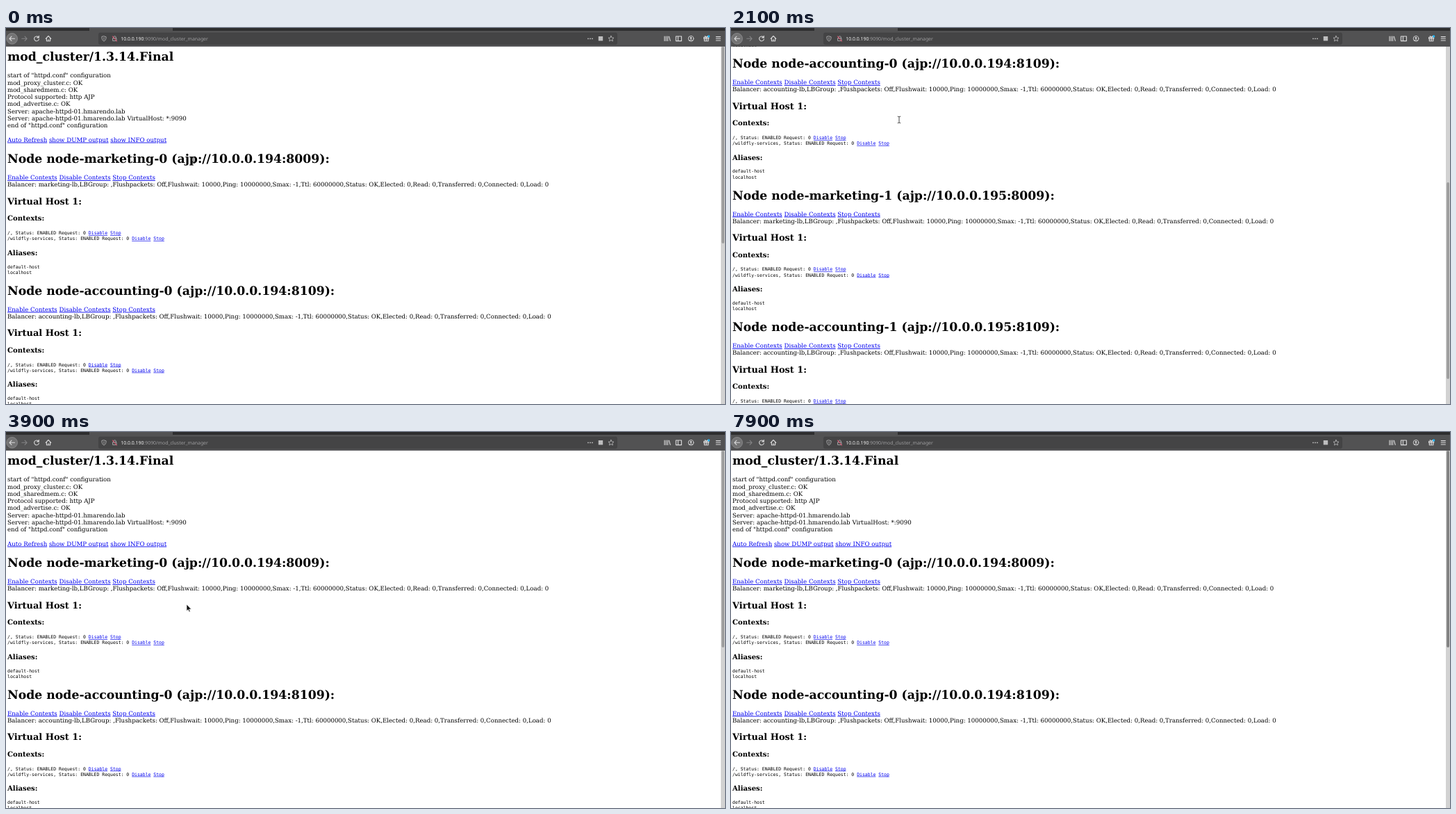
Animation, 1035 px wide and 541 px high, one loop 8200 ms. Source, as an HTML page:

```html
<!DOCTYPE html>
<html lang="en">
<head>
<meta charset="utf-8">
<title>mod_cluster manager</title>
<style>
html, body { margin: 0; width: 100%; height: 100%; overflow: hidden; background: #fff; }
svg { display: block; width: 1035px; height: 541px; }
text { text-rendering: geometricPrecision; }
#page { font-family: "DejaVu Serif", "Noto Serif", serif; }
.h1 { font-size: 17.25px; font-weight: bold; }
.h2 { font-size: 12.94px; font-weight: bold; }
.h3 { font-size: 10.09px; font-weight: bold; }
.body { font-size: 8.63px; }
.pre { font-size: 6.48px; font-family: "DejaVu Sans Mono", monospace; }
.link { fill: #0000ee; text-decoration: underline; }
#url { font: 6.9px "Noto Sans", sans-serif; fill: #9d9d9f; }
.icon { fill: none; stroke: #dcdcdd; stroke-width: 1.1; stroke-linecap: round; stroke-linejoin: round; }
</style>
</head>
<body>
<svg viewBox="0 0 1035 541">
  <g id="page"></g>
  <rect x="1029" y="26" width="6" height="515" fill="#d2d2d2"/>
  <rect id="thumb" x="1030.2" width="3.8" height="283" rx="1.9"/>

  <rect width="1035" height="5" fill="#2d2d2e"/>
  <rect y="4" width="1035" height="22.3" fill="#525253"/>
  <rect x="120" y="0" width="120" height="5" fill="#525253"/>
  <rect y="25.7" width="1035" height=".8" fill="#373738"/>
  <rect x="133.5" y="7" width="746" height="16.5" rx="2" fill="#444445" stroke="#3d3d3e" stroke-width=".5"/>
  <rect id="hover" x="36.5" y="7.8" width="15.5" height="14.8" rx="2"/>
  <circle cx="8.7" cy="15.3" r="7.8" fill="#737374" stroke="#979798" stroke-width=".7"/>
  <g class="icon">
    <path d="M12.5 15.3H5M8 12.2L5 15.3l3 3.1"/>
    <path d="M22.8 15.3h7.3M27.1 12.2l3 3.1-3 3.1" stroke="#858586"/>
    <path id="reload" d="M46.7 13.2A3.4 3.4 0 1 0 47.4 16M47.3 11.4v2.5h-2.6"/>
    <path d="M57.2 15.3l3.8-3.8 3.8 3.8M58.4 15v3.8h5.2V15M61 18.6v-2.2"/>
    <g stroke-width=".8" stroke="#bdbdbe">
      <path d="M141 11.8l3.1 1c0 3.2-.8 5.1-3.1 6.2-2.3-1.1-3.1-3-3.1-6.2zM141 13.7v3.1"/>
      <path d="M154.6 14.7v-1a1.9 1.9 0 0 1 3.8 0v1M154 14.8h5v3.6h-5z"/>
      <path d="M153.4 12l6 7" stroke="#e2506e" stroke-width="1.1"/>
      <path d="M871 11.3l1.2 2.6 2.8.3-2.1 1.9.6 2.8-2.5-1.4-2.5 1.4.6-2.8-2.1-1.9 2.8-.3z"/>
    </g>
    <path d="M948 12v6.5M950.3 12v6.5M952.6 12v6.5M954.4 12.2l1.8 6.2"/>
    <path d="M964.4 12h8v6.6h-8zM967.4 12v6.6"/>
    <circle cx="986" cy="15.3" r="3.8" stroke-width=".9"/>
    <path d="M983.7 17.7q2.3-2 4.6 0" stroke-width=".9"/>
    <path d="M1004.6 13.4h7v2h-7zM1005.3 15.4v3.4h5.6v-3.4M1008.1 13.4v5.4M1006.3 11.6l1.8 1.8 1.8-1.8"/>
    <path d="M1022.2 12.6h6.2M1022.2 15.3h6.2M1022.2 18h6.2"/>
  </g>
  <circle cx="1011.6" cy="12" r="1.7" fill="#28b5f4"/>
  <circle cx="986" cy="14.4" r="1.3" fill="#dcdcdd"/>
  <path d="M838 15.3h.01M841 15.3h.01M844 15.3h.01" stroke="#cfcfd0" stroke-width="1.7" stroke-linecap="round"/>
  <rect x="852.8" y="12" width="6.4" height="6.4" fill="#bdbdbe"/>
  <text id="url" x="165.3" y="17.9"><tspan fill="#f2f2f2">10.0.0.190</tspan>:9090/mod_cluster_manager</text>

  <g id="cursor">
    <path id="arrow" d="M0 0V9.6L2.2 7.6 3.7 11 5.2 10.3 3.7 7.1H6.7Z" fill="#111" stroke="#fff" stroke-width=".6"/>
    <path id="beam" d="M-2.2-4.8Q0-4.8 0-3.9Q0-4.8 2.2-4.8M0-4V4M-2.2 4.8Q0 4.8 0 3.9Q0 4.8 2.2 4.8" fill="none" stroke="#333" stroke-width=".9"/>
  </g>
</svg>
<script>
const $ = id => document.getElementById(id);
const LOOP = 8200, STEP = 100;

// Distance from the middle of a line to its baseline, per style
const DROP = { h1: 6.06, h2: 4.55, h3: 3.55, body: 3.03, pre: 2.25 };
const line = (style, mid, content) =>
  `<text class="${style}" x="2" y="${mid + DROP[style]}">${content}</text>`;
const links = (...labels) =>
  labels.map(s => `<tspan class="link">${s}</tspan>`).join(' ');

function header() {
  const server = 'Server: apache-httpd-01.hmarendo.lab';
  const rows = [
    'start of "httpd.conf" configuration', 'mod_proxy_cluster.c: OK',
    'mod_sharedmem.c: OK', 'Protocol supported: http AJP', 'mod_advertise.c: OK',
    server, server + ' VirtualHost: *:9090', 'end of "httpd.conf" configuration'
  ];
  return line('h1', 41.4, 'mod_cluster/1.3.14.Final') +
    rows.map((s, i) => line('body', 68.2 + i * 10.27, s)).join('') +
    line('body', 160.6, links('Auto Refresh', 'show DUMP output', 'show INFO output'));
}

function node(i) {
  const name = i % 2 ? 'accounting' : 'marketing';
  const host = i >> 1, y = 188.4 + i * 189.5;
  const context = path => `${path}, Status: ENABLED Request: 0 ${links('Disable', 'Stop')}`;
  return line('h1', y, `Node node-${name}-${host} (ajp://10.0.0.${194 + host}:8${i % 2}09):`) +
    line('body', y + 26.7, links('Enable Contexts', 'Disable Contexts', 'Stop Contexts')) +
    line('body', y + 37, `Balancer: ${name}-lb,LBGroup: ,Flushpackets: Off,Flushwait: 10000,` +
      'Ping: 10000000,Smax: -1,Ttl: 60000000,Status: OK,Elected: 0,Read: 0,' +
      'Transferred: 0,Connected: 0,Load: 0') +
    line('h2', y + 60.7, 'Virtual Host 1:') +
    line('h3', y + 85.4, 'Contexts:') +
    line('pre', y + 106.4, context('/')) +
    line('pre', y + 114.5, context('/wildfly-services')) +
    line('h3', y + 134.7, 'Aliases:') +
    line('pre', y + 154.9, 'default-host') +
    line('pre', y + 163, 'localhost');
}

$('page').innerHTML = header() + [0, 1, 2, 3].map(node).join('');

// Keys: time, then values
const scrollKeys = [
  [1000, 0], [1300, 103.6], [1400, 103.6], [2100, 326.6], [2300, 370], [2500, 389],
  [3200, 389], [3500, 100.8], [3900, 0], [6400, 0], [6500, 80], [6600, 80],
  [6700, 125.8], [6800, 125.8], [6900, 110], [7000, 110], [7300, 0]
];
const cursorKeys = [
  [100, 270, 190], [400, 262, 206], [800, 225, 132], [1400, 225, 132], [2100, 242, 132],
  [3200, 242, 132], [3500, 260, 248], [4200, 260, 248], [4300, 208, 166], [4400, 208, 166],
  [4900, 49, 13], [5500, 49, 13], [5800, 155, 34], [5900, 155, 34], [6100, 225, 55],
  [6200, 225, 55], [6300, 293, 144], [6400, 293, 144], [6500, 298, 171], [6800, 298, 171],
  [6900, 296, 162], [7400, 296, 162], [7900, -14, 6]
];

function at(keys, t) {
  const n = keys.findIndex(k => k[0] > t);
  if (n === 0) return keys[0].slice(1);
  if (n < 0) return keys[keys.length - 1].slice(1);
  const a = keys[n - 1], b = keys[n], p = (t - a[0]) / (b[0] - a[0]);
  return a.slice(1).map((v, i) => v + (b[i + 1] - v) * p);
}

const show = (id, on) => $(id).setAttribute('visibility', on ? 'visible' : 'hidden');

function draw(now) {
  const t = Math.floor(now % LOOP / STEP) * STEP;
  const [scroll] = at(scrollKeys, t), [x, y] = at(cursorKeys, t);
  const beam = t < 600 || (t >= 2000 && t < 3300);
  const pressed = t >= 5400 && t < 5600;
  $('page').setAttribute('transform', `translate(0 ${-scroll})`);
  $('thumb').setAttribute('y', 27 + scroll * .597);
  $('thumb').setAttribute('fill', t < 5400 ? '#9d9d9d' : '#808080');
  $('cursor').setAttribute('transform', `translate(${x} ${y})`);
  show('beam', beam);
  show('arrow', !beam);
  show('hover', t >= 4900 && t < 5600);
  $('hover').setAttribute('fill', pressed ? '#8e8e8f' : '#6c6c6d');
  $('reload').style.stroke = pressed ? '#b9b9ba' : '';
  requestAnimationFrame(draw);
}
requestAnimationFrame(draw);
</script>
</body>
</html>
```
